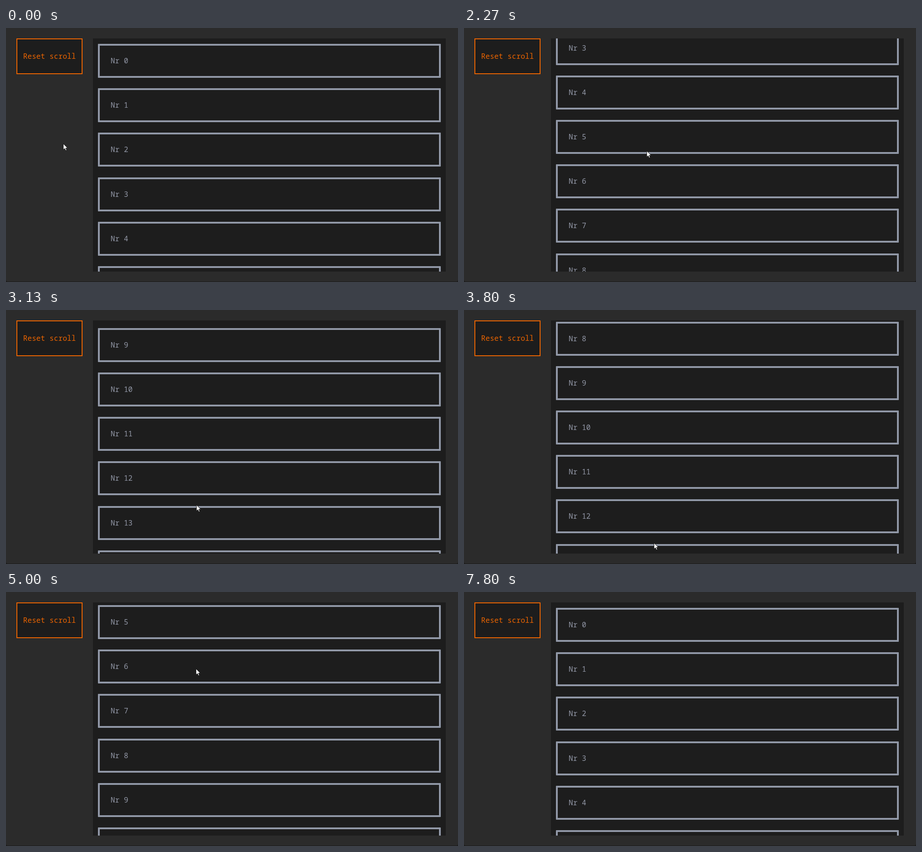
An HTML page for the animation above (8990 ms loop, 998 px wide and 561 px high).

```html
<!DOCTYPE html>
<html lang="en">
<head>
<meta charset="utf-8">
<title>Drag to scroll</title>
<style>
  html, body { margin: 0; width: 100%; height: 100%; overflow: hidden; background: #1a1a1a; }
  #stage {
    position: relative; width: 998px; height: 561px; overflow: hidden;
    font: 500 16.2px/1 "Noto Sans Mono", "DejaVu Sans Mono", monospace;
  }
  #stage > *, .item { position: absolute; box-sizing: border-box; }
  #window { inset: 0 0 1px; background: #2b2b2b; border-radius: 0 0 4px 4px; }
  #reset {
    left: 23px; top: 23px; width: 146px; height: 79px;
    border: 2px solid #eb6400; background: #1d1d1d; color: #eb6400;
    line-height: 74px; text-align: center; white-space: nowrap;
  }
  #panel { left: 192px; top: 23px; width: 779px; height: 515px; background: #1d1d1d; overflow: hidden; }
  #list { position: absolute; left: 11px; top: 12px; width: 757px; }
  .item {
    left: 0; width: 757px; height: 75px; padding-left: 24px;
    border: 4px solid #9198a7; border-radius: 1px; color: #9297a6;
    line-height: 66px; white-space: pre;
  }
  #cursor { left: -1px; top: -1px; width: 11px; height: 18px; overflow: visible; }
</style>
</head>
<body>
<div id="stage">
  <div id="window"></div>
  <div id="reset">Reset scroll</div>
  <div id="panel"><div id="list"></div></div>
  <svg id="cursor" viewBox="0 0 11 18">
    <path d="M.6 .6V13.8L3.7 11L5.8 15.8L8 14.9L5.9 10.2H10Z" fill="#fff" stroke="#151515"/>
  </svg>
</div>
<script>
  const LOOP = 8990, TICK = 1000 / 15, PITCH = 98.2, RESET_TICK = 99;
  const list = document.getElementById("list");
  const cursor = document.getElementById("cursor");

  for (let i = 0; i < 20; i++) {
    const item = document.createElement("div");
    item.className = "item";
    item.textContent = "Nr " + i;
    item.style.top = Math.round(i * PITCH) + "px";
    list.append(item);
  }

  // Pointer path: tick, x, y, and 1 when the button is held on the way there
  const path = [
    [0, 127, 256], [7, 127, 256], [11, 137, 261], [15, 137, 261],
    [18, 370, 245], [20, 374, 208, 1], [23, 385, 50, 1],
    [27, 400, 400], [29, 402, 400], [34, 404, 272, 1], [37, 410, 60, 1],
    [40, 414, 420], [43, 418, 76, 1],
    [47, 421, 431], [51, 424, 50, 1], [57, 420, 515, 1], [58, 420, 569, 1],
    [59, 420, 530], [60, 420, 530],
    [65, 419, 106], [70, 420, 350, 1], [75, 420, 170], [82, 420, 351, 1],
    [90, 418, 395], [100, 78, 63], [105, 78, 63],
    [109, 94, 180], [117, 59, 566], [135, 59, 566]
  ];

  // Scroll offset on arrival at each point
  const offsets = [0];
  for (let i = 1; i < path.length; i++) {
    offsets[i] = offsets[i - 1] + (path[i][3] ? path[i - 1][2] - path[i][2] : 0);
  }

  const rate = (i, k) => (path[i + 1][k] - path[i][k]) / (path[i + 1][0] - path[i][0]);

  // Tangent that never overshoots: zero at turning points
  function slope(i, k) {
    if (i === 0 || i === path.length - 1) return 0;
    const a = rate(i - 1, k), b = rate(i, k);
    return a * b > 0 ? 2 * a * b / (a + b) : 0;
  }

  function along(i, k, tick) {
    const [p, q] = [path[i], path[i + 1]];
    const span = q[0] - p[0], u = (tick - p[0]) / span, v = 1 - u;
    return p[k] * v * v * (1 + 2 * u) + q[k] * u * u * (1 + 2 * v)
      + span * u * v * (v * slope(i, k) - u * slope(i + 1, k));
  }

  function draw(now) {
    const tick = Math.floor((now % LOOP + 4) / TICK);
    let i = 0;
    while (i < path.length - 2 && path[i + 1][0] <= tick) i++;
    const x = along(i, 1, tick), y = along(i, 2, tick);
    const dragged = path[i + 1][3] ? path[i][2] - y : 0;
    const scroll = tick < RESET_TICK ? offsets[i] + dragged : 0;
    list.style.transform = `translateY(${-Math.round(scroll)}px)`;
    cursor.style.transform = `translate(${Math.round(x)}px, ${Math.round(y)}px)`;
  }

  const start = performance.now();
  function loop() {
    draw(performance.now() - start);
    requestAnimationFrame(loop);
  }
  loop();
</script>
</body>
</html>
```
